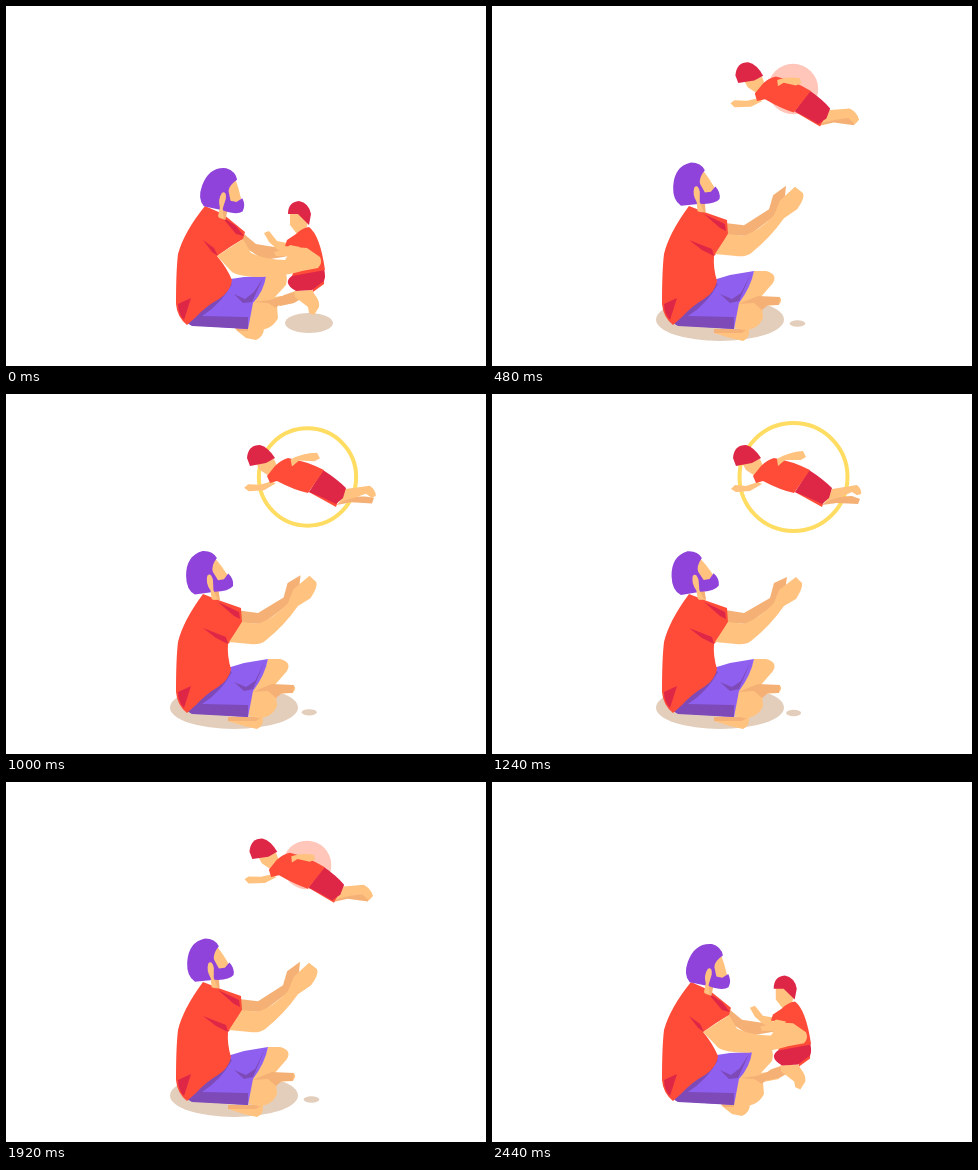
Animation, 480 px wide and 360 px high, one loop 2480 ms. Source, as an HTML page:

```html
<!DOCTYPE html>
<html lang="en">
<head>
<meta charset="utf-8">
<title>Up in the air</title>
<style>
html, body { margin: 0; width: 100%; height: 100%; overflow: hidden; background: #fff; }
svg { display: block; width: 480px; height: 360px; }
</style>
</head>
<body>
<svg id="stage" viewBox="0 0 480 360" xmlns="http://www.w3.org/2000/svg">
  <clipPath id="cut"><rect id="cutBox" x="257" y="280" width="60" height="70"/></clipPath>
  <g id="ground" fill="#e3cdbb">
    <ellipse id="wide" cx="228" cy="313.5" rx="64" ry="21.5" clip-path="url(#cut)"/>
    <ellipse id="small" rx="1" ry="1"/>
  </g>
  <circle id="disc" cx="301" cy="83" fill="#ffc6b9"/>
  <circle id="ring" cx="301.5" cy="83" fill="none" stroke="#ffdc62" stroke-width="4"/>
</svg>
<script>
const LOOP = 2480, TURN = 1200;
const KEYS = [0, 280, 760, TURN];
const RED = '#ff4c39', DARK = '#de2747', SKIN = '#ffc37f', TAN = '#f5b175';
const HAIR = '#8f43da', SHORTS = '#8f60ef', SHADE = '#7d4ab8';

const $ = id => document.getElementById(id);
const clamp = v => Math.min(1, Math.max(0, v));
const smooth = p => p * p * (3 - 2 * p);
const EASES = [p => p ** 1.5, p => 1 - (1 - p) ** 4, smooth];

// Blend two strings that differ only in their numbers.
const NUM = /-?\d+(\.\d+)?/g;
function blend(a, b, p) {
  const to = b.match(NUM);
  let i = 0;
  return a.replace(NUM, n => (+n + (to[i++] - n) * p).toFixed(2));
}

const moving = [];
function add(tag, parent, attrs, attr, poses) {
  const el = document.createElementNS('http://www.w3.org/2000/svg', tag);
  for (const k in attrs) el.setAttribute(k, attrs[k]);
  parent.append(el);
  if (poses.length > 1) moving.push({ el, attr, poses });
  else el.setAttribute(attr, poses[0]);
  return el;
}
const stage = $('stage');
const shape = (fill, ...poses) => add('path', stage, { fill }, 'd', poses);

// Father: far arm, legs
shape(TAN,
  'M238,228 L250,238 L268,241 L280,240 L290,243 L283,250 L258,254 L234,238Z',
  'M233,217 L252,222 L277,205 L282,192 L294,186 L290,206 L256,230 L233,229Z',
  'M233,217 L252,219 L277,203 L281,189 L294,179 L292,203 L256,230 L233,229Z',
  'M233,216 L252,219 L278,204 L282,189 L295,183 L292,204 L256,230 L233,229Z');
shape(SKIN,
  'M229,322 L258,321 Q258,331 250,334 L240,332 L230,324Z',
  'M222,323 L257,323 Q258,332 251,335 L238,332 L222,327Z');
shape(TAN,
  'M230,322 L242,322 L242,325 L232,325Z',
  'M222,323 L256,323 L250,327 L222,327Z');
shape(SKIN,
  'M260,269 L270,261 Q284,264 280,279 L269,291 L282,289 Q290,291 287,297 L271,300 L272,312 Q266,324 252,324 L242,322 Q241,308 247,297 Q256,284 260,269Z',
  'M262,265 L274,265 Q286,268 281,277 L268,292 L287,291 Q292,294 286,299 L270,300 L271,312 Q266,324 252,324 L243,322 Q241,308 247,297 Q258,280 262,265Z');
shape(TAN,
  'M248,296 L264,294 L276,290 L280,293 L275,297 L270,302 L262,297Z',
  'M246,298 L266,290 L288,291 L287,299 L276,299 L270,304 L262,297Z');
shape(SHORTS,
  'M218,274 L238,271 L260,270 Q258,285 247,297 L242,323 L184,319 L186,304 Q204,290 218,274Z',
  'M218,275 L238,269 L262,265 Q259,281 247,297 L242,323 L184,319 L186,304 Q204,290 218,275Z');
shape(SHADE, 'M181,317 L188,306 Q208,290 222,276 L226,278 Q215,298 196,310 L242,311 L242,323 L186,320Z');
shape(SHADE,
  'M228,288 L239,293 L248,286 L257,272 L246,296 L237,297Z',
  'M228,288 L240,293 L249,287 L259,267 L247,295 L238,297Z');

// Father: shirt
shape(RED,
  'M199,200 L217,208 L239,226 L237,233 L224,241 L211,250 Q221,262 226,274 Q225,285 213,293 Q200,300 190,311 L181,319 Q171,311 170,298 Q170,265 172,248 Q178,226 199,200Z',
  'M197,200 L215,207 L235,214 L236,228 L228,244 L222,250 Q221,262 225,275 Q223,286 212,293 Q200,300 190,311 L181,319 Q171,311 170,298 Q170,265 172,248 Q177,227 197,200Z');
shape(DARK,
  'M215,210 L230,220 L238,230 L230,228Z',
  'M212,208 L233,218 L234,225 L228,222Z');
shape(DARK,
  'M197,234 L208,242 L212,250 L206,246Z',
  'M197,234 L220,243 L222,250 L210,244Z');
shape(DARK, 'M172,298 L185,292 L178,314 Q172,308 172,298Z');

// Father: head
const headBox = add('g', stage, {}, 'transform', [
  'translate(7 6) rotate(12 208 200)',
  'translate(0 0) rotate(0 208 200)',
  'translate(-1 0) rotate(-6 208 200)',
  'translate(-1 0) rotate(-10 208 200)']);
const head = (fill, d) => add('path', headBox, { fill }, 'd', [d]);
head(TAN, 'M206,194 L214,194 L214,207 L207,206Z');
head(SKIN, 'M214,163 L220,173 L225,183 L222,189 L212,189 L208,176Z');
head(HAIR, 'M190,198 Q182,192 184,178 Q187,158 204,156 Q214,157 217,165 Q210,172 211,178 L215,187 L221,187 L226,182 Q231,188 229,195 Q224,200 210,198Z');
head(SKIN, 'M205,181 Q209,178 210,186 L209,196 L212,206 L206,205 L206,196 Q202,188 205,181Z');

// Child: legs, shorts
shape(TAN,
  'M290,285 L278,289 L270,295 L274,300 L288,297 L300,290Z',
  'M300,179 L318,180 L334,190 L332,198 L316,190 L302,186Z',
  'M338,102 L358,103 L368,102 L366,109 L345,107 L332,111Z',
  'M338,103 L360,102 L368,105 L366,110 L345,109 L330,111Z');
shape(SKIN,
  'M306,284 L309,289 Q314,295 313,301 L308,309 L303,307 L302,301 L289,291 L288,285Z',
  'M313,177 L325,177 Q336,180 337,190 L332,198 L328,189 L314,187 L304,184 L300,178Z',
  'M338,95 L362,93 Q369,97 371,104 L367,108 L360,102 L349,104 L338,107 L333,110Z',
  'M340,95 L365,91 Q370,95 369,100 L365,101 L360,98 L349,103 L338,106 L333,109Z');
shape(RED,
  'M305,276 L318,270 L318,278 L307,286Z',
  'M313,172 L324,166 L323,178 L313,179Z',
  'M301,97 L318,101 L332,107 L330,113Z');
shape(DARK,
  'M289,268 L318,263 Q320,270 318,275 L306,284 L290,285 Q274,276 289,268Z',
  'M299,162 L325,153 Q327,160 324,168 L314,178 L297,181 Q296,170 299,162Z',
  'M303,98 L317,76 Q331,85 340,94 L337,104 L330,110 Q316,103 303,98Z');

// Child: front arm, face, shirt, hat, other arm
shape(SKIN,
  'M281,237 L271,235 L263,225 L258,227 L263,236 L272,244 L281,245Z',
  'M276,138 L262,139 L253,135 L250,137 L254,142 L266,146 L278,143Z',
  'M266,86 L254,89 L241,89 L237,92 L241,96 L258,95 L269,89Z',
  'M266,88 L254,92 L243,91 L239,95 L244,98 L258,97 L270,90Z');
shape(SKIN,
  'M284,206 L293,206 L302,216 L299,228 L291,228 L284,219Z',
  'M267,114 L276,116 L285,115 L286,124 L279,128 L269,121Z',
  'M250,69 L258,68 L268,65 L272,74 L263,82 L254,76Z');
shape(RED,
  'M290,228 Q296,222 303,221 Q314,229 319,264 L286,270 Q291,258 290,242 L279,240 L281,234Z',
  'M283,124 Q291,116 298,121 Q315,133 325,154 L299,164 Q296,152 289,141 L273,141 L277,130Z',
  'M269,72 Q275,66 282,64 Q300,67 318,76 L302,99 Q288,96 271,87 L264,89 L261,82Z');
shape(DARK,
  'M282,208 Q282,196 293,195 Q303,197 305,208 L303,219 L292,208Z',
  'M262,112 Q263,97 274,97 Q286,98 288,114 L280,118 L264,115Z',
  'M241,64 Q242,51 254,51 Q262,53 269,64 L260,69 L244,72Z');
shape(SKIN,
  'M284,239 L294,241 Q290,248 282,250 L270,250 L268,246 L279,243Z',
  'M285,136 L295,136 Q293,150 283,160 L273,164 L272,160 L281,153Z',
  'M286,73 L284,66 Q296,60 311,61 L314,66 L308,69 L293,67Z',
  'M286,72 L285,65 Q297,58 311,57 L314,63 L309,66 L293,66Z');

// Father: near arm
shape(SKIN,
  'M237,233 L245,247 Q260,254 279,254 L287,241 L301,242 L314,251 Q317,257 312,262 L296,265 Q280,270 256,271 Q234,271 226,266 L211,250Z',
  'M236,228 L252,230 Q268,224 282,211 L288,198 L303,186 L312,190 Q314,196 306,206 L292,214 Q278,232 259,249 Q254,252 244,251 L223,249Z',
  'M236,228 L252,230 Q268,224 282,209 L288,194 L303,180 L311,187 Q313,192 305,203 L292,212 Q278,232 259,247 Q254,251 244,250 L223,248Z',
  'M236,228 L252,230 Q268,224 282,209 L287,196 L304,183 L310,189 Q311,194 304,205 L292,212 Q278,232 259,247 Q254,251 244,250 L223,248Z');

moving.push({ el: $('small'), attr: 'transform', poses: [
  'translate(303 317) scale(24 10)', 'translate(305 317.5) scale(10 4.2)',
  'translate(305.5 317.5) scale(7.5 3.2)', 'translate(301.5 319) scale(7.5 3.2)'] });

const show = (id, on) => $(id).setAttribute('visibility', on ? 'visible' : 'hidden');

function draw() {
  const t = performance.now() % LOOP;
  // The toss runs up, then back down, and settles before the loop.
  const m = t <= TURN ? t : t < 2 * TURN ? 2 * TURN - t : (t - 2 * TURN) * 0.4;
  const i = m < KEYS[1] ? 0 : m < KEYS[2] ? 1 : 2;
  const p = EASES[i](clamp((m - KEYS[i]) / (KEYS[i + 1] - KEYS[i])));
  for (const { el, attr, poses } of moving) {
    const pose = k => poses[Math.min(k, poses.length - 1)];
    el.setAttribute(attr, blend(pose(i), pose(i + 1), p));
  }

  show('wide', t >= 160 && t < 2380);
  $('cutBox').setAttribute('x', t < 320 ? 257 : 160);
  $('cutBox').setAttribute('width', t < 320 ? 60 : 150);
  show('small', t < 2420);

  const open = m >= 940;
  show('disc', m > 400 && !open);
  $('disc').setAttribute('r', 45 * smooth(clamp((m - 400) / 150)));
  show('ring', open);
  $('ring').setAttribute('r', 45 + 9 * smooth(clamp((m - 940) / 140)));
  requestAnimationFrame(draw);
}
draw();
</script>
</body>
</html>
```
